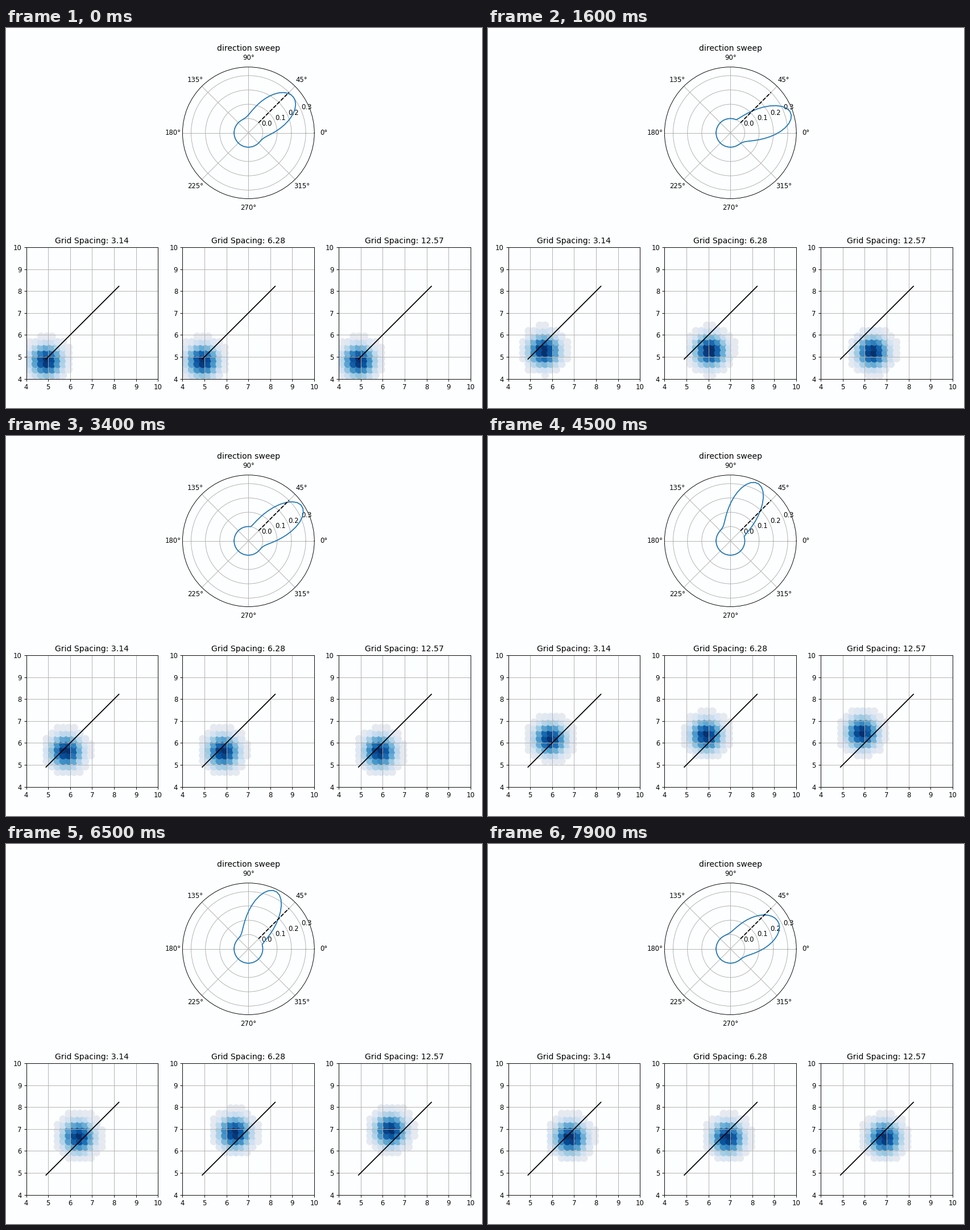
A matplotlib script that plays this animation: 837x669 px, repeating every 8000 ms.

```python
import numpy as np
import matplotlib.pyplot as plt
from matplotlib.animation import FuncAnimation
from matplotlib.colors import LinearSegmentedColormap

W, H, DPI = 837, 669, 83.7
FRAMES, STEP_MS = 80, 100
BG = "#fdfeff"
HEADING = 45
START, END, SPEED = 4.9, 8.22, 0.0236  # run along the diagonal
PITCH, SIGMA, CUTOFF = 0.2525, 0.5, 0.07
SWEEP = 10  # steps per sweep; sweeps alternate left and right

# title value, forward reach, sideways reach
PANELS = [(3.14, 0.28, 0.05), (6.28, 0.71, 0.48), (12.57, 0.94, 0.82)]

cmap = LinearSegmentedColormap.from_list("bump", [
    (0, "#e8e9ec"), (.11, "#e5e9f0"), (.17, "#d8e6f4"), (.25, "#c6dbef"),
    (.375, "#9ecae1"), (.5, "#6baed6"), (.625, "#4292c6"),
    (.75, "#2171b5"), (.875, "#08519c"), (1, "#08306b")])

fig = plt.figure(figsize=(W / DPI + 1e-4, H / DPI + 1e-4), dpi=DPI, facecolor=BG)


def add_axes(left, top, size, **kw):
    box = [left / W, 1 - (top + size) / H, size / W, size / H]
    return fig.add_axes(box, facecolor=BG, **kw)


polar = add_axes(310.4, 68.7, 231.8, projection="polar")
polar.set_title("direction sweep", y=1, pad=25)
polar.set_ylim(-0.1, 0.36)
polar.set_yticks([0, 0.1, 0.2, 0.3])
theta = np.linspace(-180, 180, 100)
ring, = polar.plot(np.radians(theta), np.zeros_like(theta))
polar.plot(np.radians([HEADING, HEADING]), [0, 0.3], "k--")

axis = PITCH * (np.arange(10, 42) + 0.5)
cells = np.stack(np.meshgrid(axis, axis), axis=-1).reshape(-1, 2)
bumps = []
for n, (spacing, _, _) in enumerate(PANELS):
    ax = add_axes(35.6 + 274.75 * n, 386, 231.6)
    ax.set_title(f"Grid Spacing: {spacing}")
    ax.set(xlim=(4, 10), ylim=(4, 10), xticks=range(4, 11), yticks=range(4, 11))
    ax.grid(True)
    ax.plot([START, END], [START, END], "k")
    bumps.append(ax.scatter([], [], s=115, c=[], cmap=cmap, vmin=0, vmax=1))


def pulse(t, peak, rise, fall):
    d = t - peak
    return np.exp(-(d / (rise if d < 0 else fall)) ** 2 / 2)


def swing(t, rise, fall):
    """Pull to the current side, less what is left of the previous sweep."""
    return pulse(t, 7, rise, fall) - pulse(t + SWEEP, 7, rise, fall)


def direction_curve(t, side):
    dip = pulse(t, 9, 1.1, 1.2) + pulse(t + SWEEP, 9, 1.1, 1.2)
    height, width = 0.345 - 0.062 * dip, 18.5 + 5.5 * dip
    peak = HEADING + side * 30 * swing(t, 2.2, 1.7)
    gap = (theta - peak + 180) % 360 - 180
    floor = max(0, height - 0.3)
    wide = np.exp(-(gap / (width * (1.1 - 0.1 * dip))) ** 2 / 2)
    sharp = np.exp(-(gap / (1.03 * width)) ** 2 / 2)
    sharp = np.maximum(0, (sharp - floor) / (1 - floor))
    return height * np.where(gap * side > 0, wide, sharp)


def bump_center(i, t, side, reach, spread):
    fast = pulse(t, 7, 1.25, 0.9)
    settle = 0.09 * np.exp(-i / 3)
    lag = 0.08 + 0.1 * np.cos(2 * np.pi * (t - 0.7) / SWEEP)
    ahead = reach * fast - lag + settle
    aside = side * (0.22 * swing(t, 3.2, 2.3) + spread * fast)
    return START + SPEED * i + np.array([ahead - aside, ahead + aside]) / np.sqrt(2)


def update(i):
    sweep, t = divmod(i, SWEEP)
    side = 1 if sweep % 2 == 0 else -1
    ring.set_ydata(direction_curve(t, side))
    for bump, (_, reach, spread) in zip(bumps, PANELS):
        # the visible part of each overlapped dot sits low and left
        center = bump_center(i, t, side, reach, spread) + 0.05
        rate = np.exp(-((cells - center) ** 2).sum(axis=1) / (2 * SIGMA ** 2))
        rate /= rate.max()
        active = rate > CUTOFF
        bump.set_offsets(cells[active])
        bump.set_array(rate[active])
    return [ring, *bumps]


update(0)
anim = FuncAnimation(fig, update, frames=FRAMES, interval=STEP_MS,
                     repeat=True, repeat_delay=0, blit=False)
plt.show()
```
